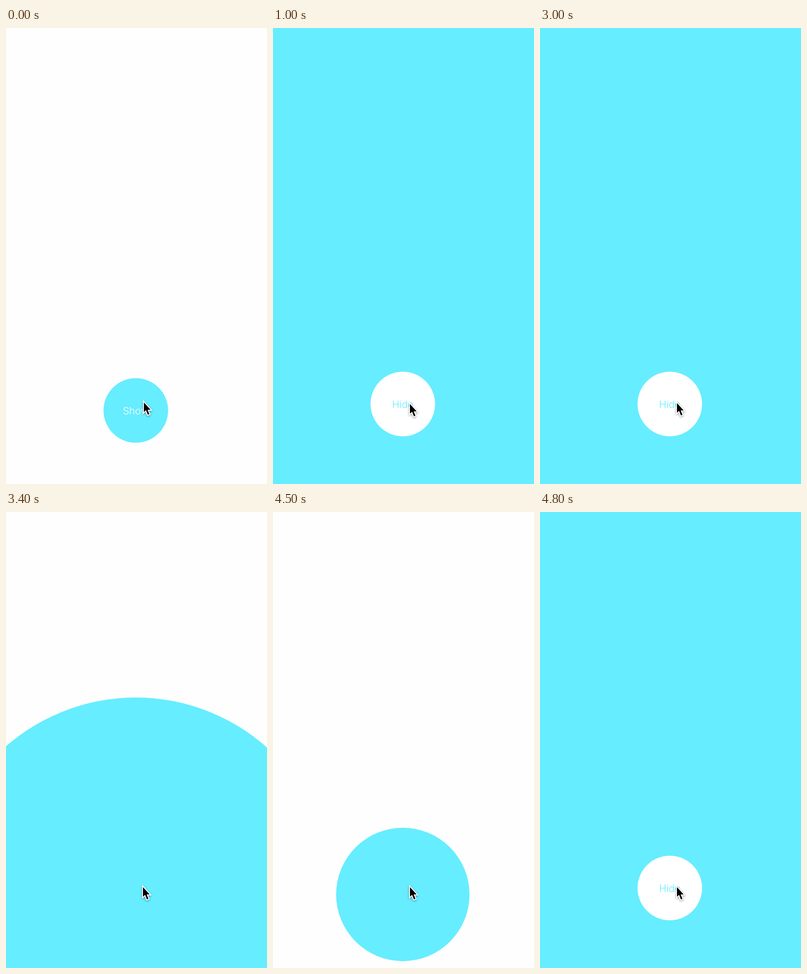
An HTML page with a canvas for the animation above (5.1 s loop, 566 by 989 pixels).

```html
<!DOCTYPE html>
<html lang="en">
<head>
<meta charset="utf-8">
<title>Circular transition</title>
<style>
  html, body { margin: 0; width: 100%; height: 100%; overflow: hidden; background: #fefefe; }
  canvas { display: block; }
</style>
</head>
<body>
<canvas id="stage" width="566" height="989"></canvas>
<script>
const ctx = document.getElementById('stage').getContext('2d');
const W = 566, H = 989, LOOP = 5100, STEP = 100;
const CYAN = '#66edff', WHITE = '#fefefe';
const CX = 281.5, SHOW_Y = 829.5, HIDE_Y = 815.5, BUTTON_R = 70;
const FULL_R = Math.hypot(W - CX, SHOW_Y);
const DURATION = 400;
const ARROW = [[2, 4.5], [2, 25.5], [6.6, 21.3], [10.6, 31.3], [14, 29.9], [10, 20.6], [16.6, 20.6]];

// Cubic bezier (0.42, 0, 0.58, 1), solved by bisection.
function easeInOut(x) {
  if (x <= 0) return 0;
  if (x >= 1) return 1;
  let lo = 0, hi = 1;
  for (let i = 0; i < 24; i++) {
    const s = (lo + hi) / 2, r = 1 - s;
    if (3 * r * r * s * 0.42 + 3 * r * s * s * 0.58 + s * s * s < x) lo = s;
    else hi = s;
  }
  return lo * lo * (3 - 2 * lo);
}

const progress = (t, start) => easeInOut((t - start) / DURATION);

function disc(y, r, color) {
  ctx.fillStyle = color;
  ctx.beginPath();
  ctx.arc(CX, y, r, 0, Math.PI * 2);
  ctx.fill();
}

function button(label, y, fill, ink, pressed) {
  disc(y, BUTTON_R, fill);
  ctx.globalAlpha = pressed ? 0.25 : 1;
  ctx.font = '300 21.5px Inter, sans-serif';
  ctx.textAlign = 'center';
  ctx.textBaseline = 'alphabetic';
  ctx.fillStyle = ink;
  ctx.fillText(label, CX, y + 8.2);
  ctx.globalAlpha = 1;
}

function cursor(x, y) {
  ctx.save();
  ctx.translate(x, y);
  ctx.beginPath();
  ARROW.forEach(([px, py]) => ctx.lineTo(px, py));
  ctx.closePath();
  ctx.lineWidth = 4;
  ctx.lineJoin = 'miter';
  ctx.strokeStyle = '#fff';
  ctx.shadowColor = 'rgba(0, 0, 0, 0.4)';
  ctx.shadowBlur = 4;
  ctx.shadowOffsetY = 1.5;
  ctx.stroke();
  ctx.shadowColor = 'transparent';
  ctx.fillStyle = '#000';
  ctx.fill();
  ctx.restore();
}

function draw(t) {
  const shown = (t >= 1000 && t < 3300) || t >= 4800;
  ctx.fillStyle = shown ? CYAN : WHITE;
  ctx.fillRect(0, 0, W, H);

  if (shown) {
    button('Hide', HIDE_Y, '#fff', CYAN, t >= 3100 && t < 3300);
  } else {
    const pressed = t === 500 || t === 4300;
    button('Show', SHOW_Y, CYAN, '#fff', pressed);
    const scale = t < 1000 ? progress(t, 531.7)
      : t < 4000 ? 1 - progress(t, 3197)
      : progress(t, 4387.3);
    if (scale > 0) disc(SHOW_Y, FULL_R * scale, CYAN);
  }

  if (t < 100) cursor(297, 807.5);
  else cursor(295, t < 2000 ? 811 : 809);
}

function tick() {
  const t = performance.now() % LOOP;
  draw(Math.floor(t / STEP) * STEP);
  requestAnimationFrame(tick);
}
tick();
</script>
</body>
</html>
```
